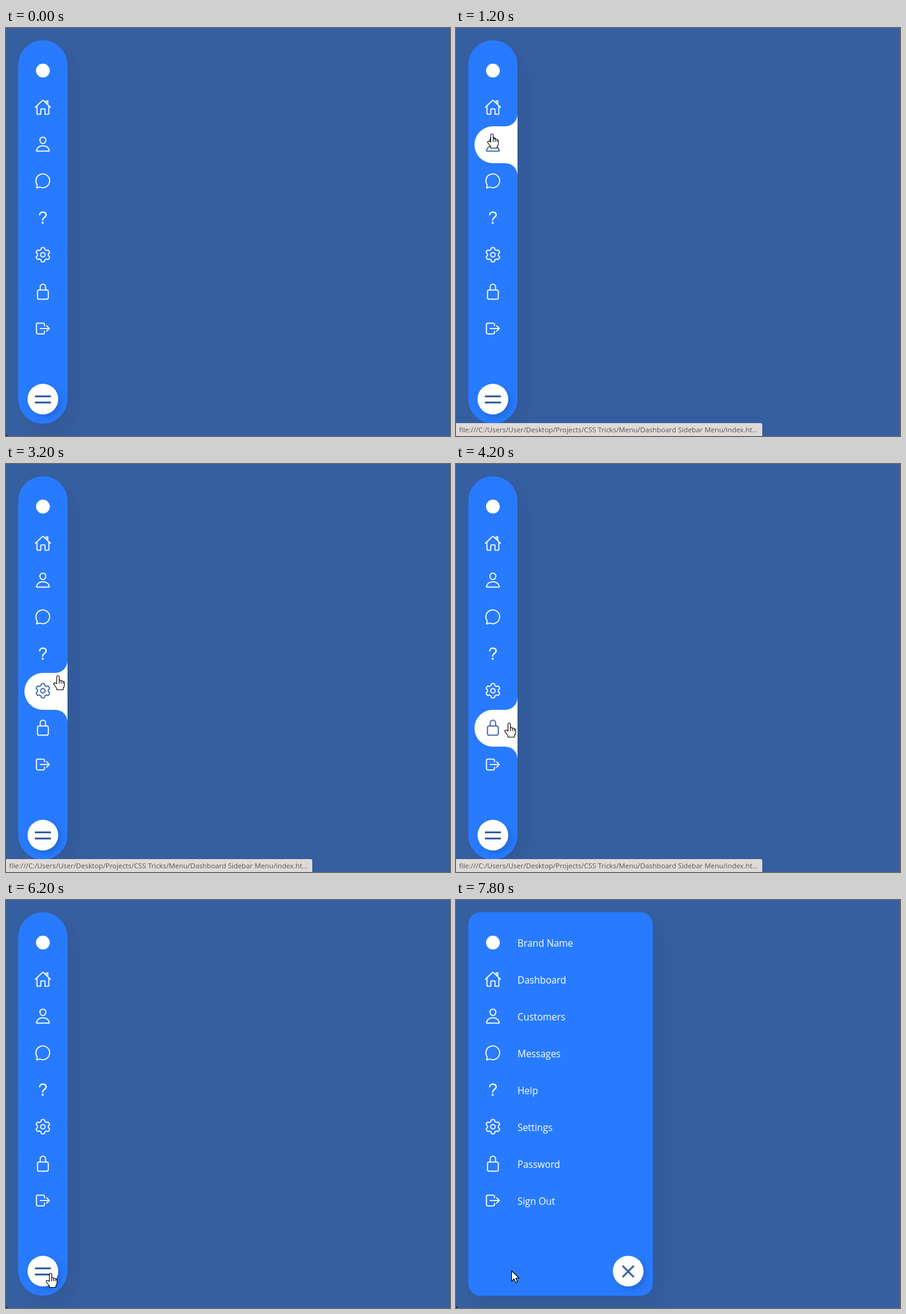
Animation, 722 px wide and 664 px high, one loop 8 s. Source, as an HTML page with a canvas:

```html
<!DOCTYPE html>
<html lang="en">
<head>
<meta charset="utf-8">
<title>Sidebar menu</title>
<style>
  html, body { margin: 0; width: 100%; height: 100%; overflow: hidden; background: #365fa1; }
  canvas { display: block; }
</style>
</head>
<body>
<canvas id="stage" width="722" height="664"></canvas>
<script>
const ctx = document.getElementById('stage').getContext('2d');
const LOOP = 8000, TICK = 200, OPEN_AT = 6540;
const BG = '#365fa1', PANEL = '#287bff', WHITE = '#fff';
const URL_TEXT = 'file:///C:/Users/User/Desktop/Projects/CSS Tricks/Menu/Dashboard Sidebar Menu/index.ht...';

// Pointer path: time, x, y
const POINTER = [
  [200, 118, 112], [400, 72, 118], [800, 55, 133], [1000, 56, 148], [1200, 58, 172],
  [1600, 62, 205], [2000, 66, 236], [2400, 68, 262], [2600, 72, 284], [3000, 80, 325],
  [3200, 84, 344], [3800, 88, 392], [4200, 86, 421], [4400, 84, 448], [4600, 82, 470],
  [5000, 78, 508], [5200, 76, 535], [5600, 73, 580], [5800, 72, 596], [6200, 72, 607],
  [7400, 72, 607], [7600, 72, 606], [7800, 90, 603]
];

// Icons live in a 512-unit box
const stroke = (d, width = 32) => ({ path: new Path2D(d), width });
const disc = (x, y, r) => {
  const path = new Path2D();
  path.arc(x, y, r, 0, 7);
  return { path };
};

function gear() {
  const points = [];
  for (let k = 0; k < 6; k++) {
    for (const [deg, r] of [[-21, 162], [-12, 216], [12, 216], [21, 162]]) {
      const a = (k * 60 + deg - 90) * Math.PI / 180;
      points.push([256 + r * Math.cos(a), 256 + r * Math.sin(a)]);
    }
  }
  const path = new Path2D();
  const [first, last] = [points[0], points[points.length - 1]];
  path.moveTo((first[0] + last[0]) / 2, (first[1] + last[1]) / 2);
  points.forEach((p, i) => {
    const next = points[(i + 1) % points.length];
    path.arcTo(...p, ...next, 24);
  });
  path.closePath();
  path.moveTo(322, 256);
  path.arc(256, 256, 66, 0, 7);
  return { path, width: 32 };
}

const ROWS = [
  ['Brand Name', disc(256, 262, 205)],
  ['Dashboard', stroke('M80 212v236a16 16 0 0 0 16 16h96V328a24 24 0 0 1 24-24h80a24 24 0 0 1 24 24v136h96a16 16 0 0 0 16-16V212M480 256L267 52c-5-5-17-5-22 0L32 256M400 179V64h-48v69')],
  ['Customers', stroke('M344 144c-4 53-44 96-88 96s-84-43-88-96c-4-55 35-96 88-96s92 42 88 96zM256 304c-87 0-175 48-192 139-2 11 4 21 16 21h352c11 0 18-10 16-21C431 352 343 304 256 304z')],
  ['Messages', stroke('M88 380c2-6-3-12-7-19A204 204 0 1 1 173 438c-8-3-15-3-23 0l-68 25c-8 2-15-4-13-12z')],
  ['Help', stroke('M160 164s1-33 34-59C213 89 235 84 256 84c19 0 35 3 45 8 17 8 51 29 51 72 0 46-30 66-63 89S248 298 248 324', 40), disc(248, 400, 32)],
  ['Settings', gear()],
  ['Password', stroke('M336 208v-95a80 80 0 0 0-160 0v95M144 208h224a48 48 0 0 1 48 48v176a48 48 0 0 1-48 48H144a48 48 0 0 1-48-48V256a48 48 0 0 1 48-48z')],
  ['Sign Out', stroke('M304 336v40a40 40 0 0 1-40 40H104a40 40 0 0 1-40-40V136a40 40 0 0 1 40-40h152c22 0 48 18 48 40v40M368 336l80-80-80-80M176 256h256')]
];

const ARROW = new Path2D('M0 0V17l4-4 2.6 6.2 2.8-1.2-2.6-6H12z');
const HAND = new Path2D('M-2 13V2a2 2 0 0 1 4 0v6a1.8 1.8 0 0 1 3.2.8 1.8 1.8 0 0 1 3.1.9 1.5 1.5 0 0 1 2.2 1.5V15q0 3.5-2 5.500v2.500H-2v-2.500L-6.500 14.500a1.700 1.700 0 0 1 2.500-2.500z');
const KNUCKLES = new Path2D('M2 8v5M5.200 9v4M8.300 10v3');

const clamp = v => Math.min(1, Math.max(0, v));
const mix = (a, b, p) => a + (b - a) * p;

// The CSS "ease" curve, solved by bisection
function ease(x) {
  if (x <= 0 || x >= 1) return clamp(x);
  const bez = (s, a, b) => 3 * s * (1 - s) ** 2 * a + 3 * s * s * (1 - s) * b + s ** 3;
  let lo = 0, hi = 1;
  for (let i = 0; i < 24; i++) {
    const mid = (lo + hi) / 2;
    if (bez(mid, 0.25, 0.25) < x) lo = mid; else hi = mid;
  }
  return bez(lo, 0.1, 1);
}

function pointerAt(t) {
  if (t < POINTER[0][0]) return null;
  const i = POINTER.findIndex(k => k[0] > t);
  if (i < 0) return POINTER[POINTER.length - 1].slice(1);
  const [a, b] = [POINTER[i - 1], POINTER[i]];
  const p = (t - a[0]) / (b[0] - a[0]);
  return [mix(a[1], b[1], p), mix(a[2], b[2], p)];
}

function setShadow(x, y, blur, alpha) {
  ctx.shadowColor = `rgba(0,0,0,${alpha})`;
  ctx.shadowOffsetX = x;
  ctx.shadowOffsetY = y;
  ctx.shadowBlur = blur;
}

function drawPanel(right, radius) {
  ctx.save();
  setShadow(15, 15, 25, 0.06);
  ctx.fillStyle = PANEL;
  ctx.beginPath();
  ctx.roundRect(20, 20, right - 20, 624, radius);
  ctx.fill();
  ctx.restore();
}

function drawTab(row, right) {
  const top = 40 + row * 60, bottom = top + 60;
  ctx.fillStyle = WHITE;
  ctx.beginPath();
  ctx.moveTo(right, top - 20);
  ctx.arc(right - 20, top - 20, 20, 0, Math.PI / 2);
  ctx.lineTo(60, top);
  ctx.arc(60, top + 30, 30, -Math.PI / 2, Math.PI / 2, true);
  ctx.lineTo(right - 20, bottom);
  ctx.arc(right - 20, bottom + 20, 20, -Math.PI / 2, 0);
  ctx.fill();
}

function drawIcon(parts, y, color) {
  ctx.save();
  ctx.translate(46, y - 14);
  ctx.scale(28 / 512, 28 / 512);
  ctx.lineCap = ctx.lineJoin = 'round';
  ctx.strokeStyle = ctx.fillStyle = color;
  for (const { path, width } of parts) {
    if (width) {
      ctx.lineWidth = width;
      ctx.stroke(path);
    } else ctx.fill(path);
  }
  ctx.restore();
}

function drawRows(active, right, radius) {
  ctx.save();
  ctx.beginPath();
  ctx.roundRect(20, 20, right - 20, 624, radius);
  ctx.clip();
  ctx.font = '500 15.4px "Open Sans", "Noto Sans", sans-serif';
  ROWS.forEach(([label, ...parts], i) => {
    const y = 69 + i * 60;
    drawIcon(parts, y, i === active ? BG : WHITE);
    if (right > 100) {
      ctx.fillStyle = WHITE;
      ctx.fillText(label, 100, y + 7);
    }
  });
  ctx.restore();
}

function drawToggle(x, turn) {
  ctx.save();
  ctx.translate(x, 604);
  ctx.save();
  setShadow(5, 5, 10, 0.15);
  ctx.fillStyle = WHITE;
  ctx.beginPath();
  ctx.arc(0, 0, 25, 0, 7);
  ctx.fill();
  ctx.restore();
  ctx.fillStyle = BG;
  for (const [side, angle] of [[-1, -315], [1, -405]]) {
    ctx.save();
    ctx.translate(0, 0.5 + side * 5 * (1 - turn));
    ctx.rotate(angle * turn * Math.PI / 180);
    ctx.fillRect(-13, -1.5, 26, 3);
    ctx.restore();
  }
  ctx.restore();
}

function drawCorner() {
  ctx.fillStyle = '#15181d';
  ctx.beginPath();
  ctx.moveTo(0, 659);
  ctx.quadraticCurveTo(0, 664, 5, 664);
  ctx.lineTo(0, 664);
  ctx.fill();
}

function drawStatus() {
  ctx.fillStyle = '#e0dad7';
  ctx.beginPath();
  ctx.roundRect(0, 643, 498, 21, [0, 3, 0, 0]);
  ctx.fill();
  ctx.fillStyle = '#55565a';
  ctx.font = '11.35px "Open Sans", "Noto Sans", sans-serif';
  ctx.fillText(URL_TEXT, 5, 658);
}

function drawPointer([x, y], hand) {
  ctx.save();
  ctx.translate(Math.round(x) + 0.5, Math.round(y) + 0.5);
  ctx.lineWidth = 1.1;
  ctx.lineJoin = 'round';
  ctx.fillStyle = WHITE;
  ctx.strokeStyle = '#000';
  const shape = hand ? HAND : ARROW;
  ctx.fill(shape);
  ctx.stroke(shape);
  if (hand) ctx.stroke(KNUCKLES);
  ctx.restore();
}

function draw(t) {
  const open = ease((t - OPEN_AT) / 500);
  const turn = ease((t - OPEN_AT) / 700);
  const right = mix(100, 320, open), radius = mix(40, 20, open);
  const pointer = pointerAt(t);
  let active = -1, hand = false;
  if (pointer) {
    const [x, y] = pointer;
    if (x > 30 && x < 100 && y >= 40 && y < 520) active = Math.floor((y - 40) / 60);
    const onToggle = t < 7600 && Math.hypot(x - 60, y - 604) < 25;
    hand = active >= 0 || onToggle;
  }

  ctx.fillStyle = BG;
  ctx.fillRect(0, 0, 722, 664);
  drawPanel(right, radius);
  if (active >= 0) drawTab(active, right);
  drawRows(active, right, radius);
  drawToggle(right - 40, turn);
  drawCorner();
  if (t >= 400 && t < 5800) drawStatus();
  if (pointer) drawPointer(pointer, hand);
}

const start = performance.now();
function frame() {
  const t = (performance.now() - start) % LOOP;
  draw(Math.floor(t / TICK) * TICK);
  requestAnimationFrame(frame);
}
frame();
</script>
</body>
</html>
```
